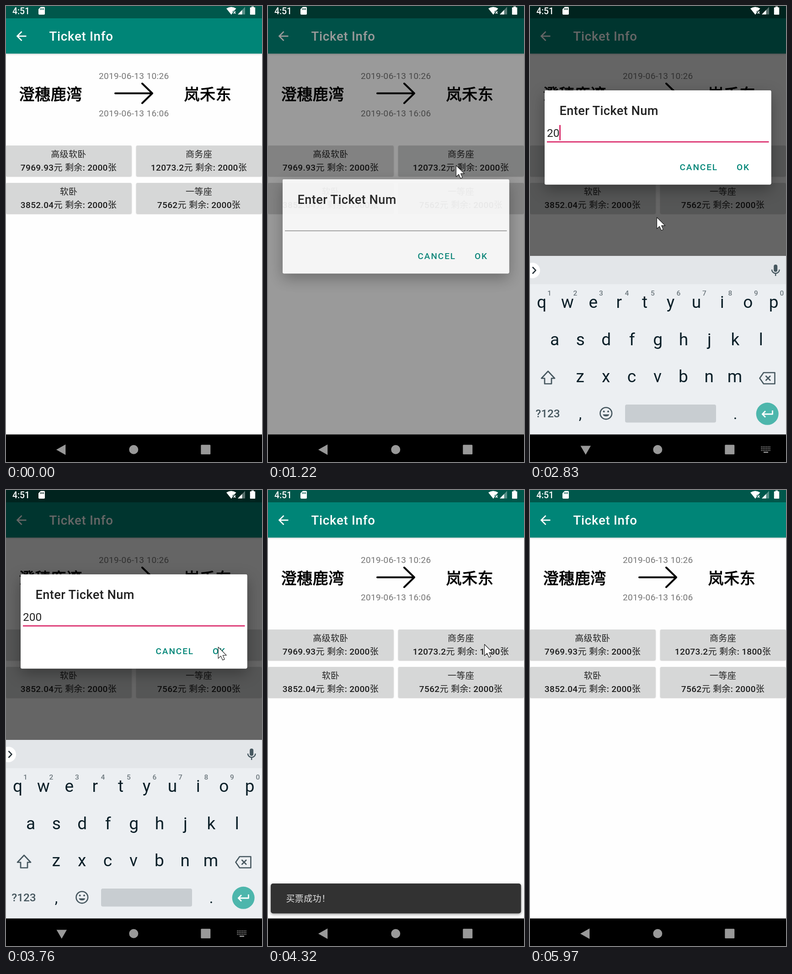
Write an HTML page that moves like this. It is 560 px wide and 1000 px high and loops after 6.39 s.

```html
<!DOCTYPE html>
<html lang="zh">
<head>
<meta charset="utf-8">
<title>Ticket Info</title>
<style>
html, body { margin: 0; width: 100%; height: 100%; overflow: hidden; background: #fefefe; }
svg { display: block; width: 100vw; height: 100vh; }
text { font-family: Roboto, "Noto Sans CJK SC", "Noto Sans CJK", sans-serif; white-space: pre; }
.mid { text-anchor: middle; }
.body { font-size: 19.05px; letter-spacing: .34px; }
.med { font-weight: 500; }
.line { fill: none; stroke-linejoin: round; }
.card { filter: drop-shadow(0 1px 1.3px rgba(0,0,0,.26)); }
</style>
</head>
<body>
<svg id="stage" viewBox="0 0 560 1000" preserveAspectRatio="none" xmlns="http://www.w3.org/2000/svg"></svg>
<script>
const LOOP = 6390;
const DIM = 0.6;
const LIFT = 195;
const DIGIT = 13.7;

const text = (x, y, str, cls = '', attrs = '') =>
  `<text x="${x}" y="${y}" class="${cls}" ${attrs}>${str}</text>`;
const rect = (x, y, w, h, fill, attrs = '') =>
  `<rect x="${x}" y="${y}" width="${w}" height="${h}" fill="${fill}" ${attrs}/>`;
const line = (d, color, width, attrs = '') =>
  `<path class="line" d="${d}" stroke="${color}" stroke-width="${width}" ${attrs}/>`;
// Chinese characters keep the regular weight inside medium text
const mixed = str => str.replace(/[\u4e00-\u9fff]+/g, '<tspan font-weight="400">$&</tspan>');

function seat(x, y, name, price, id) {
  const cx = x + 137;
  return rect(x, y, 274.5, 67, '#d6d7d7', 'rx="2.5" class="card"') +
    (id ? `<circle id="ripple" cx="411" cy="350" clip-path="url(#seatClip)"/>` : '') +
    text(cx, y + 26, name, 'mid body', 'fill="#222"') +
    `<text x="${cx}" y="${y + 55}" class="mid body med" fill="#1c1c1c">` +
    mixed(price + '元 剩余: ') + `<tspan ${id ? `id="${id}"` : ''}>2000</tspan>` + mixed('张') + '</text>';
}

function page() {
  const station = 'font-size="34" letter-spacing=".6" stroke="#000" stroke-width="1"';
  return rect(0, 0, 560, 1000, '#fefefe') +
    rect(0, 27, 560, 77.4, '#008577', 'style="filter:drop-shadow(0 1.5px 2px rgba(0,0,0,.2))"') +
    rect(0, 0, 560, 27, '#00574b') +
    `<path fill="#fff" transform="translate(17.2 49.7) scale(1.361)"
      d="M20 11H7.83l5.59-5.59L12 4l-8 8 8 8 1.41-1.41L7.83 13H20z"/>` +
    text(94.5, 76, 'Ticket Info', 'med', 'fill="#fff" font-size="27.6" letter-spacing=".75"') +
    text(279.7, 160, '2019-06-13 10:26', 'mid body', 'fill="#757575"') +
    text(279.7, 242, '2019-06-13 16:06', 'mid body', 'fill="#757575"') +
    text(28.5, 206, '澄穗鹿湾', '', station) +
    text(389.5, 206, '岚禾东', '', station) +
    line('M239 191.5H320M298 170L320 191.5L298 213', '#000', 4, 'stroke-linecap="round"') +
    seat(0, 306, '高级软卧', '7969.93') +
    seat(285, 306, '商务座', '12073.2', 'stock') +
    seat(0, 388, '软卧', '3852.04') +
    seat(285, 388, '一等座', '7562');
}

function snackbar() {
  return '<g id="snack">' +
    rect(6, 863, 547.5, 65.5, '#323232', 'rx="5" style="filter:drop-shadow(0 2px 3px rgba(0,0,0,.4))"') +
    text(39.5, 903, '买票成功！', 'body', 'fill="#e2e2e2"') + '</g>';
}

function dialog() {
  const action = 'fill="#008577" font-size="19.05" letter-spacing="1.9"';
  const panel = attrs => rect(32, 380, 495.5, 206.5, '#fff', 'rx="3" ' + attrs);
  return '<g id="dialog">' +
    panel('id="shadow" style="filter:drop-shadow(0 11px 16px rgba(0,0,0,.32))"') + panel('') +
    text(64.5, 434, 'Enter Ticket Num', 'med', 'fill="#212121" font-size="27.2" letter-spacing=".4"') +
    line('M37 493H522.5', '#888', 1.5, 'id="rule"') +
    text(37, 482, '', '', 'id="field" fill="#222" font-size="24.4"') +
    rect(36.8, 456, 2.7, 33.5, '#d81b60', 'id="caret"') +
    text(327.5, 555, 'CANCEL', 'med', action) +
    text(452, 555, 'OK', 'med', action) + '</g>';
}

function keyboard() {
  const ink = '#46575f';
  const row = (str, x, y) => [...str].map((c, i) =>
    text(x + 56.4 * i, y, c, 'mid', 'fill="#0b1f28" font-size="37"')).join('');
  const hints = [...'1234567890'].map((c, i) =>
    text(42.5 + 56.5 * i, 635, c, 'mid med', 'fill="#6d787e" font-size="15.5"')).join('');
  return '<g id="keys">' +
    rect(0, 548, 560, 470, '#eceff2') + rect(0, 548, 560, 62, '#e3e6e9') +
    '<circle cx="5" cy="580" r="17" fill="#fff"/>' +
    line('M5.5 572.5L12.5 579.7L5.5 587', '#263238', 2.6) +
    rect(533.2, 567, 8, 16, ink, 'rx="4"') +
    line('M529 578a8.3 8.3 0 0 0 16.6 0M537.2 586.5V592', ink, 2.4) +
    row('qwertyuiop', 25.5, 662) + hints +
    row('asdfghjkl', 54, 744) + row('zxcvbnm', 109.7, 825) +
    line('M39.5 801L54 816.5H47V828.5H32V816.5H25Z', ink, 2.7) +
    line('M511 804H535.5V828.5H511L502.5 816.2ZM515.5 811l10.5 10.5m0-10.5l-10.5 10.5', ink, 2.6) +
    text(39, 902, '?123', 'mid med', `fill="${ink}" font-size="24.4"`) +
    text(110, 906, ',', 'mid', 'fill="#0b1f28" font-size="33"') +
    text(449, 906, '.', 'mid', 'fill="#0b1f28" font-size="33"') +
    '<circle cx="166.3" cy="893.3" r="12.8" fill="none" stroke="' + ink + '" stroke-width="2.6"/>' +
    `<circle cx="161.6" cy="889.3" r="2" fill="${ink}"/><circle cx="171" cy="889.3" r="2" fill="${ink}"/>` +
    `<path d="M159.3 895.5h14a7.2 6 0 0 1-14 0z" fill="${ink}"/>` +
    rect(208, 874, 199, 39.5, '#c8cdd1', 'rx="4"') +
    '<circle cx="519.2" cy="894.3" r="24.5" fill="#4db6ac"/>' +
    line('M530.5 887V895H508.5M515 888.2L508.3 895L515 901.8', '#fff', 2.8) +
    rect(0, 548, 560, 470, '#000', 'id="keysDim"') + '</g>';
}

function statusIcons() {
  return '<g fill="#fff">' +
    text(14, 18.3, '4:51', 'med', 'font-size="19.3"') +
    `<path fill-rule="evenodd" d="M76 2h7a2 2 0 0 1 2 2v13a2 2 0 0 1-2 2H73a2 2 0 0 1-2-2V7z
      M75.2 5v3.6h1.6V5zM78.2 5v3.6h1.6V5zM81.2 5v3.6h1.6V5z"/>` +
    '<path d="M482 5.5Q492.5-1.5 503.5 5.5L499 10.8H496V15L492.8 19Z"/>' +
    line('M497.6 11.8l4.6 5m0-5l-4.6 5', '#fff', 1.6) +
    '<path d="M523 2V18.5H507Z" opacity=".35"/><path d="M516.5 8.7V18.5H507Z"/>' +
    '<path d="M537 1h5v2h2.2a1 1 0 0 1 1 1V18a1 1 0 0 1-1 1h-9.4a1 1 0 0 1-1-1V4a1 1 0 0 1 1-1H537z"/></g>';
}

function navBar() {
  let dots = '';
  for (let r = 0; r < 3; r++)
    for (let c = 0; c < 6; c++)
      dots += `<rect x="${505.5 + c * 3.6}" y="${966 + r * 3.8}" width="2" height="2"/>`;
  return rect(0, 939.6, 560, 61, '#000') + '<g id="nav">' +
    '<path id="back"/><circle cx="279.3" cy="972.7" r="10"/>' +
    '<rect x="426.3" y="962.3" width="21" height="21" rx="1.5"/>' +
    `<g id="switcher">${dots}<rect x="511" y="977.5" width="10" height="2.4"/></g></g>`;
}

const stage = document.getElementById('stage');
stage.innerHTML =
  '<defs><clipPath id="seatClip"><rect x="285" y="306" width="274.5" height="67" rx="2.5"/></clipPath></defs>' +
  page() + snackbar() + rect(0, 0, 560, 1000, '#000', 'id="dim"') + dialog() +
  keyboard() + statusIcons() + navBar() +
  `<path id="pointer" fill="#fff" stroke="#1a1a1a" stroke-width="1.1" stroke-linejoin="round"
    d="M.5 .5V25.5L6.3 20.2L10.2 29L14.4 27.2L10.6 18.6H18.6Z"/>`;

const el = {};
stage.querySelectorAll('[id]').forEach(n => { el[n.id] = n; });
const set = (id, attrs) => { for (const k in attrs) el[id].setAttribute(k, attrs[k]); };

const span = (t, a, b) => Math.min(1, Math.max(0, (t - a) / (b - a)));
const smooth = p => p * p * (3 - 2 * p);
const easeOut = p => 1 - (1 - p) ** 2.4;

// start, end, x, y
const MOVES = [
  [30, 390, 396, 291], [390, 580, 411, 349], [1670, 2120, 277, 463],
  [3240, 3840, 473, 338], [5170, 5370, 458, 588], [5770, 5970, 436, 1002]
];

function pointerAt(t) {
  let x = 427, y = 1002;
  for (const [a, b, tx, ty] of MOVES) {
    const p = smooth(span(t, a, b));
    x += (tx - x) * p;
    y += (ty - y) * p;
  }
  return [x, y];
}

function draw(t) {
  const closing = t >= 3900;
  const [px, py] = pointerAt(t);
  set('pointer', { transform: `translate(${px} ${py})` });

  set('ripple', {
    r: 240 * easeOut(span(t, 680, 920)),
    opacity: 0.075 * span(t, 670, 740) * (1 - span(t, 1130, 1270))
  });
  el.stock.textContent = t < 4000 ? '2000' : '1800';

  const dim = closing ? DIM * (1 - span(t, 3880, 4048)) : DIM * span(t, 1125, 1270);
  set('dim', { opacity: dim });

  const shown = closing ? 1 - span(t, 3880, 3985) : span(t, 1088, 1235);
  const lift = LIFT * easeOut(span(t, 2310, 2520));
  set('dialog', { opacity: shown, transform: `translate(0 ${-lift})` });
  set('shadow', { opacity: 1 - span(t, 3890, 3930) });

  const focused = t >= 2090;
  const typed = [2530, 2830, 2970].filter(s => t >= s).length;
  const blinkOff = t >= 3420 && t < 3900;
  set('rule', { stroke: focused ? '#d81b60' : '#888', 'stroke-width': focused ? 2.6 : 1.5 });
  el.field.textContent = '200'.slice(0, typed);
  set('caret', { x: 36.8 + DIGIT * typed, opacity: focused && !blinkOff ? 1 : 0 });

  const leave = span(t, 3955, 4130);
  const keysAlpha = span(t, 2295, 2450) * (1 - leave);
  const keysDrop = 78 * (1 - easeOut(span(t, 2290, 2500)) + leave * leave);
  set('keys', { opacity: keysAlpha, transform: `translate(0 ${keysDrop})` });
  set('keysDim', { opacity: closing ? dim : 0 });

  const pop = easeOut(span(t, 4130, 4310));
  const scale = 0.8 + 0.2 * pop;
  set('snack', {
    opacity: span(t, 4130, 4280) * (1 - span(t, 5250, 5330)),
    transform: `translate(279.7 896) scale(${scale}) translate(-279.7 -896)`
  });

  const typing = t >= 2320 && !closing;
  set('back', { d: typing ? 'M110.5 964.5H133L121.8 984Z' : 'M110 973L130.3 961.5V984.5Z' });
  set('nav', { fill: t >= 3910 && t < 4040 ? '#c0c0c0' : '#999' });
  set('switcher', { opacity: closing ? 0.1 * (1 - span(t, 3930, 3980)) : span(t, 2320, 2480) });
}

const begin = performance.now();
function tick() {
  draw((performance.now() - begin) % LOOP);
  requestAnimationFrame(tick);
}
draw(0);
requestAnimationFrame(tick);
</script>
</body>
</html>
```
